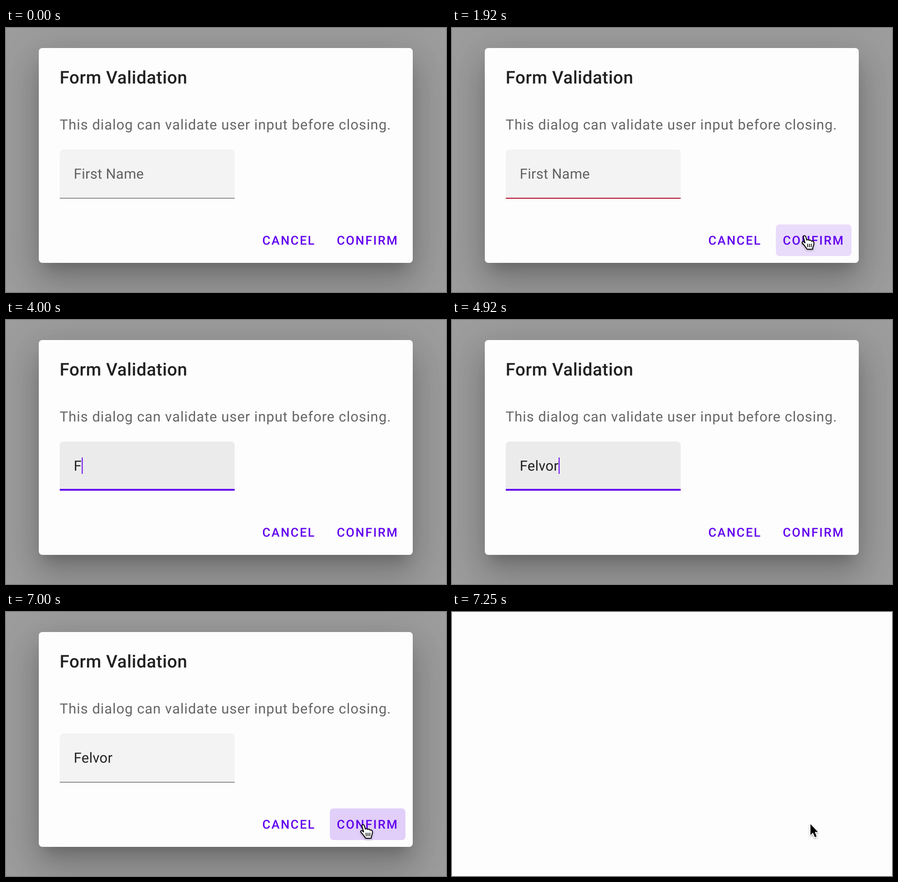
Recreate the animation shown at these times as an HTML page. Size 966 by 580 pixels, loop 7.76 s.

```html
<!DOCTYPE html>
<html lang="en">
<head>
<meta charset="utf-8">
<title>Form Validation</title>
<style>
  html, body { margin: 0; width: 100%; height: 100%; overflow: hidden; background: #fdfdfd; }
  body { position: relative; }
  #scrim, svg { position: absolute; left: 0; top: 0; width: 966px; height: 580px; }
  #scrim { background: rgba(0, 0, 0, .38); }
  #dialog { position: absolute; inset: 0; }
  #surface {
    position: absolute; left: 71.5px; top: 44px; width: 821px; height: 472px;
    border-radius: 7.7px; background: #fdfdfd;
    box-shadow: 0 21px 29px -13.5px rgba(0, 0, 0, .2), 0 46px 73px 6px rgba(0, 0, 0, .14),
      0 17px 89px 15px rgba(0, 0, 0, .12);
  }
  text { font-family: Roboto, sans-serif; white-space: pre; text-rendering: geometricPrecision; }
  .title { font-size: 38.6px; font-weight: 500; letter-spacing: .0125em; fill: rgba(0, 0, 0, .87); }
  .body { font-size: 30.88px; letter-spacing: .03125em; fill: rgba(0, 0, 0, .6); }
  .input { font-size: 30.88px; letter-spacing: .009375em; fill: rgba(0, 0, 0, .87); }
  .button { font-size: 27.02px; font-weight: 500; letter-spacing: .0892857em; fill: #6200ee; }
  #placeholder { fill: rgba(0, 0, 0, .6); }
  #cursor { filter: drop-shadow(0 2px 2px rgba(0, 0, 0, .3)); }
</style>
</head>
<body>
<div id="scrim"></div>
<div id="dialog">
  <div id="surface"></div>
  <svg viewBox="0 0 966 580">
    <clipPath id="buttonClip"><rect x="711" y="431.5" width="166" height="69.5" rx="7.7"/></clipPath>
    <text class="title" x="117.8" y="122">Form Validation</text>
    <text class="body" x="117.8" y="222.5">This dialog can validate user input before closing.</text>
    <path id="field" d="M118 375V274.7a7.7 7.7 0 0 1 7.7-7.7H494.3a7.7 7.7 0 0 1 7.7 7.7V375z"/>
    <text id="placeholder" class="input" x="148.8" y="331">First Name</text>
    <text id="value" class="input" x="148.8" y="331"></text>
    <rect id="caret" y="302" width="2" height="36" fill="#6200ee"/>
    <rect id="line" x="118" y="373" width="384" height="2"/>
    <rect id="focusLine" y="371" height="4"/>
    <g clip-path="url(#buttonClip)" fill="#6200ee">
      <rect id="buttonState" x="711" y="431" width="166" height="70"/>
      <circle id="ripple"/>
    </g>
    <text class="button" x="562.8" y="476">CANCEL</text>
    <text class="button" x="726.2" y="476">CONFIRM</text>
  </svg>
</div>
<svg viewBox="0 0 966 580">
  <g id="cursor" stroke-linejoin="round" stroke-linecap="round">
    <path id="arrow" d="M0 0V24L5.4 18.8L9.7 28.8L13.6 27.1L9.4 17.2H16.4Z"
      stroke="#fff" stroke-width="3" paint-order="stroke"/>
    <g id="hand" transform="translate(-10)" fill="#fff" stroke="#000" stroke-width="2">
      <path d="M4.5 4.5C4 .5 8.3 0 9.6 3.5L12 11C13 9.4 16 9.6 17 11.6C18.5 10.3 21.2 10.8 22 13.2C24.5 12.2 27.3 13.5 27.5 16.5C28 20.5 26.3 23.5 25.3 26.5L24.8 31H12.5C11.5 28 8.5 26 6.5 22.5L2 17.5C.8 14.8 3.5 13.3 5.7 15.2L8.2 17.2Z"/>
      <path d="M13.5 19.5l.4 6.5M17.7 19.5v6.5M21.8 19.5l-.2 6.5" stroke-width="1.7"/>
    </g>
    <g id="beam" fill="none">
      <path id="beamPath" d="M-5-14.5Q0-14.5 0-10Q0-14.5 5-14.5M-5 14.5Q0 14.5 0 10Q0 14.5 5 14.5M0-10V10M-3 4H3"/>
      <use href="#beamPath" stroke="#fff" stroke-width="4.5"/>
      <use href="#beamPath" stroke="#000" stroke-width="2"/>
    </g>
  </g>
</svg>
<script>
const LOOP = 7760, STEP = 1000 / 12;
const NAME = "Felvor", TYPE_START = 3950, TYPE_GAP = 125;
const TYPE_END = TYPE_START + TYPE_GAP * (NAME.length - 1);
const SUBMIT = 1400, FOCUS = 3400, RESUBMIT = 6700, CLOSE = 7034;

// Pointer hot spot: time, x, y
const path = [
  [500, 880, 592], [1050, 779, 460], [1400, 777, 455], [2400, 777, 455], [3000, 254, 320],
  [5200, 254, 320], [5850, 765, 456], [6250, 767, 458], [6650, 787, 466]
];

const el = Object.fromEntries([...document.querySelectorAll("[id]")].map(e => [e.id, e]));
const set = (node, attrs) => Object.entries(attrs).forEach(([k, v]) => node.setAttribute(k, v));
const show = (node, on) => { node.style.display = on ? "" : "none"; };
const clamp = v => Math.max(0, Math.min(1, v));
const ease = p => p * p * (3 - 2 * p);
const within = (x, y, left, top, right, bottom) => x >= left && x <= right && y >= top && y <= bottom;

function pointerAt(t) {
  const next = path.findIndex(p => p[0] > t);
  if (next < 0) return path[path.length - 1].slice(1);
  if (next === 0) return path[0].slice(1);
  const a = path[next - 1], b = path[next];
  const p = ease((t - a[0]) / (b[0] - a[0]));
  return [1, 2].map(i => a[i] + (b[i] - a[i]) * p);
}

function drawField(t, hovered) {
  const focused = t >= FOCUS && t < RESUBMIT;
  const count = t < TYPE_START ? 0 : Math.min(NAME.length, Math.floor((t - TYPE_START) / TYPE_GAP) + 1);
  const invalid = t >= SUBMIT && !count;
  const grow = ease(clamp((t - FOCUS) / 180));

  el.value.textContent = NAME.slice(0, count);
  show(el.placeholder, !count);
  set(el.field, { fill: hovered ? "#ebebeb" : "#f3f3f3" });
  set(el.line, { fill: invalid ? "#b00020" : "rgba(0,0,0,.42)" });
  set(el.focusLine, { x: 254 - 136 * grow, width: 384 * grow, fill: invalid ? "#b00020" : "#6200ee" });
  show(el.focusLine, focused);

  const typing = t >= TYPE_START && t < TYPE_END;
  const since = t - (t < TYPE_START ? FOCUS : TYPE_END);
  show(el.caret, focused && (typing || since % 1060 < 530));
  set(el.caret, { x: 149 + (count ? el.value.getComputedTextLength() : 0) });
}

function drawButton(t, hovered) {
  const focused = t >= SUBMIT && t < FOCUS || t >= RESUBMIT;
  set(el.buttonState, { opacity: focused ? .13 : hovered ? .04 : 0 });

  const press = t - (t < FOCUS ? SUBMIT : RESUBMIT);
  const [x, y] = pointerAt(t);
  show(el.ripple, press >= 0 && press < 375);
  set(el.ripple, {
    cx: x, cy: y, r: 25 + 100 * ease(clamp(press / 225)),
    opacity: .12 * (1 - clamp((press - 225) / 150))
  });
}

function draw(t) {
  const [x, y] = pointerAt(t);
  const open = 1 - clamp((t - CLOSE) / 82);
  const onField = t > 500 && within(x, y, 118, 267, 502, 375);
  const onButton = t > 500 && t < 7200 && within(x, y, 711, 431, 877, 501);

  el.dialog.style.opacity = open;
  el.scrim.style.opacity = open ** 1.2;
  drawField(t, onField);
  drawButton(t, onButton);

  show(el.cursor, t >= 500 && (t < TYPE_START || t >= 5200));
  set(el.cursor, { transform: `translate(${x} ${y})` });
  show(el.hand, onButton);
  show(el.beam, onField);
  show(el.arrow, !onButton && !onField);
}

function tick() {
  const now = performance.now() % LOOP;
  draw(Math.floor((now + 5) / STEP) * STEP);
  requestAnimationFrame(tick);
}
tick();
</script>
</body>
</html>
```
